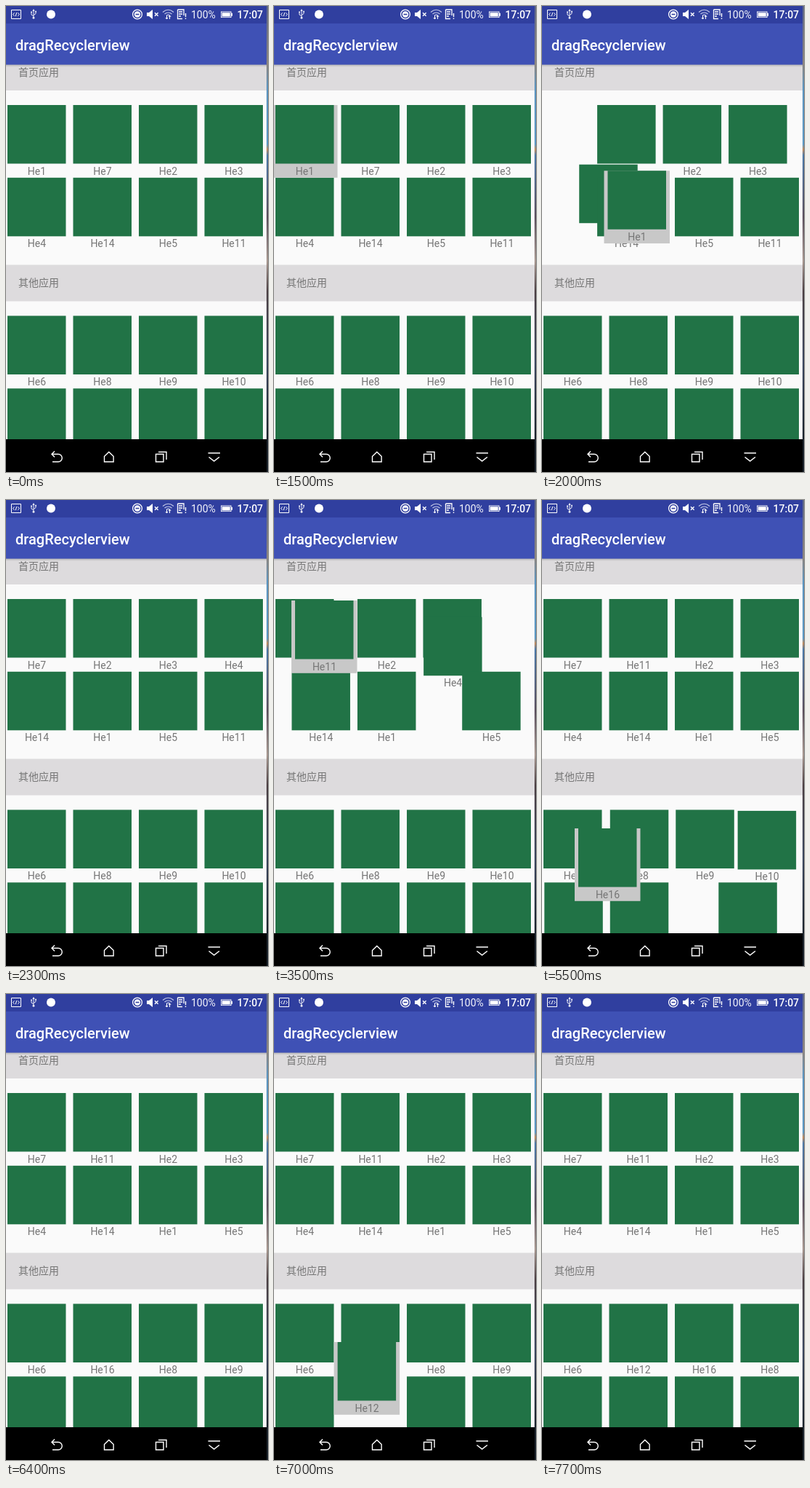
Write an HTML page with a canvas that moves like this. It is 361x640 px and loops after 8 s.

```html
<!DOCTYPE html>
<html lang="zh">
<head>
<meta charset="utf-8">
<title>dragRecyclerview</title>
<style>
  html, body { margin: 0; width: 100%; height: 100%; overflow: hidden; background: #000; }
  canvas { display: block; width: 361px; height: 640px; }
</style>
</head>
<body>
<canvas id="stage"></canvas>
<script>
const W = 361, H = 640, LOOP = 8000, STEP = 100;
const SHIFT = 250; // how long a displaced cell takes to reach its new slot
const TILE = 80.5, CELL_W = 90.5, CELL_H = 99.8, PITCH = 90.5;

const canvas = document.getElementById('stage');
const ratio = window.devicePixelRatio || 1;
canvas.width = W * ratio;
canvas.height = H * ratio;
const ctx = canvas.getContext('2d');
ctx.scale(ratio, ratio);

const sections = [
  { title: '首页应用', top: 66, items: [1, 7, 2, 3, 4, 14, 5, 11] },
  { title: '其他应用', top: 355.5, items: [6, 8, 9, 10, 12, 13, 15, 16] }
];

// Each drag: picked cell, lifetime, reorder moments, finger path [time, x, y].
const drags = [
  { section: 0, item: 1, from: 1500, to: 2300,
    moves: [[1930, 5]],
    path: [[1650, 2, 136], [1850, 50, 185], [2050, 104, 240], [2300, 92.5, 236]] },
  { section: 0, item: 11, from: 3000, to: 3800,
    moves: [[3315, 6], [3417, 1]],
    path: [[3100, 273.5, 236], [3300, 195, 205], [3500, 29, 138], [3550, 24, 137], [3800, 92.5, 136]] },
  { section: 1, item: 16, from: 5100, to: 5900,
    moves: [[5348, 6], [5481, 1]],
    path: [[5150, 273.5, 526], [5350, 190, 512], [5500, 50, 451], [5650, 46, 440], [5900, 92.5, 426]] },
  { section: 1, item: 12, from: 6700, to: 7500,
    moves: [[7080, 1]],
    path: [[6850, 92.5, 526], [7050, 86, 462], [7250, 88, 411], [7500, 92.5, 426]] }
];

const clamp = v => Math.max(0, Math.min(1, v));
const ease = v => (1 - Math.cos(Math.PI * clamp(v))) / 2;
const mix = (a, b, k) => a + (b - a) * k;

function slot(section, index) {
  const top = sections[section].top + 70;
  return { x: 2 + PITCH * (index % 4), y: top + CELL_H * Math.floor(index / 4) };
}

function layout(section, t) {
  let order = sections[section].items.slice();
  const place = {};
  order.forEach((id, i) => place[id] = slot(section, i));
  for (const drag of drags) {
    if (drag.section !== section) continue;
    for (const [start, index] of drag.moves) {
      if (t < start) continue;
      const next = order.filter(id => id !== drag.item);
      next.splice(index, 0, drag.item);
      const k = ease((t - start) / SHIFT);
      next.forEach((id, i) => {
        const a = slot(section, order.indexOf(id)), b = slot(section, i);
        place[id].x += (b.x - a.x) * k;
        place[id].y += (b.y - a.y) * k;
      });
      order = next;
    }
  }
  return { order, place };
}

function fingerAt(path, t) {
  const last = path.length - 1;
  if (t <= path[0][0]) return { x: path[0][1], y: path[0][2] };
  let i = 1;
  while (i < last && t > path[i][0]) i++;
  const [t0, x0, y0] = path[i - 1], [t1, x1, y1] = path[i];
  const k = clamp((t - t0) / (t1 - t0));
  const e = i === last ? ease(k) : k;
  return { x: mix(x0, x1, e), y: mix(y0, y1, e) };
}

function rect(x, y, w, h, color) {
  ctx.fillStyle = color;
  ctx.fillRect(x, y, w, h);
}

function text(str, x, y, font, color, align = 'left') {
  ctx.font = font + ', sans-serif';
  ctx.fillStyle = color;
  ctx.textAlign = align;
  ctx.fillText(str, x, y);
}

function stroke(d, width = 1.2, color = '#fff') {
  ctx.strokeStyle = color;
  ctx.lineWidth = width;
  ctx.stroke(new Path2D(d));
}

function fill(d) {
  ctx.fillStyle = '#fff';
  ctx.fill(new Path2D(d));
}

function circle(x, y, r, lineWidth) {
  ctx.beginPath();
  ctx.arc(x, y, r, 0, Math.PI * 2);
  ctx.fillStyle = ctx.strokeStyle = '#fff';
  if (lineWidth) {
    ctx.lineWidth = lineWidth;
    ctx.stroke();
  } else {
    ctx.fill();
  }
}

function drawCell(id, { x, y }, lifted) {
  if (lifted) rect(x - 5, y, CELL_W, CELL_H, '#c8c8c8');
  rect(x, y, TILE, TILE, '#217346');
  text('He' + id, x + TILE / 2 + 0.2, y + 95.5, '14px Roboto', '#757575', 'center');
}

function drawList(t) {
  ctx.save();
  ctx.beginPath();
  ctx.rect(0, 80, 359, 515);
  ctx.clip();
  rect(0, 80, 359, 515, '#fafafa');
  const active = drags.find(d => t >= d.from && t < d.to);
  sections.forEach((s, n) => {
    rect(0, s.top, 359, 50, '#dddbdd');
    text(s.title, 17, s.top + 29.5, '14px "Noto Sans CJK SC", "Noto Sans CJK"', '#757575');
    const { order, place } = layout(n, t);
    for (const id of order) {
      if (!active || active.section !== n || active.item !== id) drawCell(id, place[id]);
    }
  });
  if (active) drawCell(active.item, fingerAt(active.path, t), true);
  const shade = ctx.createLinearGradient(0, 80, 0, 84);
  shade.addColorStop(0, 'rgba(0,0,0,.2)');
  shade.addColorStop(1, 'rgba(0,0,0,0)');
  rect(0, 80, 359, 4, shade);
  ctx.restore();
}

function drawStatus() {
  rect(0, 0, 359, 24, '#303f9f');
  // code box, usb, notification dot
  stroke('M7.5 5.5h13v12h-13zM11.5 9.5l-2 2 2 2M16.5 9.5l2 2-2 2M14.8 9l-1.6 5', 1);
  stroke('M38 6v10M38 14l-3-2V9M38 12.5l3-2V8', 0.9);
  fill('M36.4 7l1.6-3 1.6 3zM34.2 7.5h1.7v1.8h-1.7zM40.2 6.8h1.7v1.8h-1.7z');
  circle(38, 16.3, 1.4);
  circle(62, 11.5, 6);
  // do not disturb, muted speaker
  circle(181, 11.5, 6.4, 1.3);
  circle(181, 11.5, 4.2);
  stroke('M178.5 11.5h5', 1.6, '#303f9f');
  fill('M194 9h3l5-4v13l-5-4h-3z');
  stroke('M205 9.2l4.6 4.6M209.6 9.2L205 13.8', 1.4);
  // wifi with arrows, card with warning
  stroke('M216 8.5q7.5-6.5 15 0M218.5 11q5-4 10 0M221 13.2q2.5-2 5 0', 1.2, '#c5cae8');
  stroke('M221.5 13v5M219.8 16l1.7 2 1.7-2M225.5 18v-5M223.8 15l1.7-2 1.7 2', 1);
  stroke('M236.5 5h8.5v8M243 17.5h-6.5V5M238 8h5M238 11h5M238 14h3', 1.3);
  stroke('M247.5 10v5M247.5 16.5v1.5', 1.4);
  text('100%', 255, 17, '14px Roboto', '#f2f3fa');
  fill('M296 7.5h14.5v2.3h1.5v4h-1.5v2.2H296z');
  stroke('M297.2 8.8h12v6h-12z', 0.8, '#303f9f');
  text('17:07', 318.5, 17, '500 14px Roboto', '#fff');
}

function drawNav() {
  rect(0, 595, 359, 45, '#000');
  stroke('M67 611.5l-4 4 4 4M63 615.5h9a5.2 5.2 0 0 1 0 10.5h-8', 1.4);
  stroke('M135.5 618.5l6.3-6 6.3 6v7.5h-12.6z', 1.4);
  stroke('M206.5 615.5h10.5v10.5h-10.5zM210 612.5h11v10.5', 1.4);
  stroke('M278.5 614h16.5M279.5 619.5l7.2 5.5 7.2-5.5', 1.5);
}

function drawEdge() {
  const g = ctx.createLinearGradient(0, 0, 0, H);
  [[0, '#5a6488'], [80, '#8a8480'], [112, '#5a94c0'], [190, '#5a98c4'], [197, '#c08858'],
   [205, '#4a78a8'], [290, '#5a4e5c'], [350, '#a89890'], [392, '#4a3e42'],
   [490, '#3a465e'], [600, '#182028']].forEach(([y, c]) => g.addColorStop(y / H, c));
  rect(359, 0, 2, H, g);
}

function draw(t) {
  drawList(t);
  drawStatus();
  rect(0, 24, 359, 56.6, '#3f51b5');
  text('dragRecyclerview', 13, 60.5, '500 20px Roboto', '#fff');
  drawNav();
  drawEdge();
}

const begin = performance.now();
function tick() {
  const t = (performance.now() - begin) % LOOP;
  draw(Math.floor(t / STEP) * STEP);
  requestAnimationFrame(tick);
}
tick();
</script>
</body>
</html>
```
